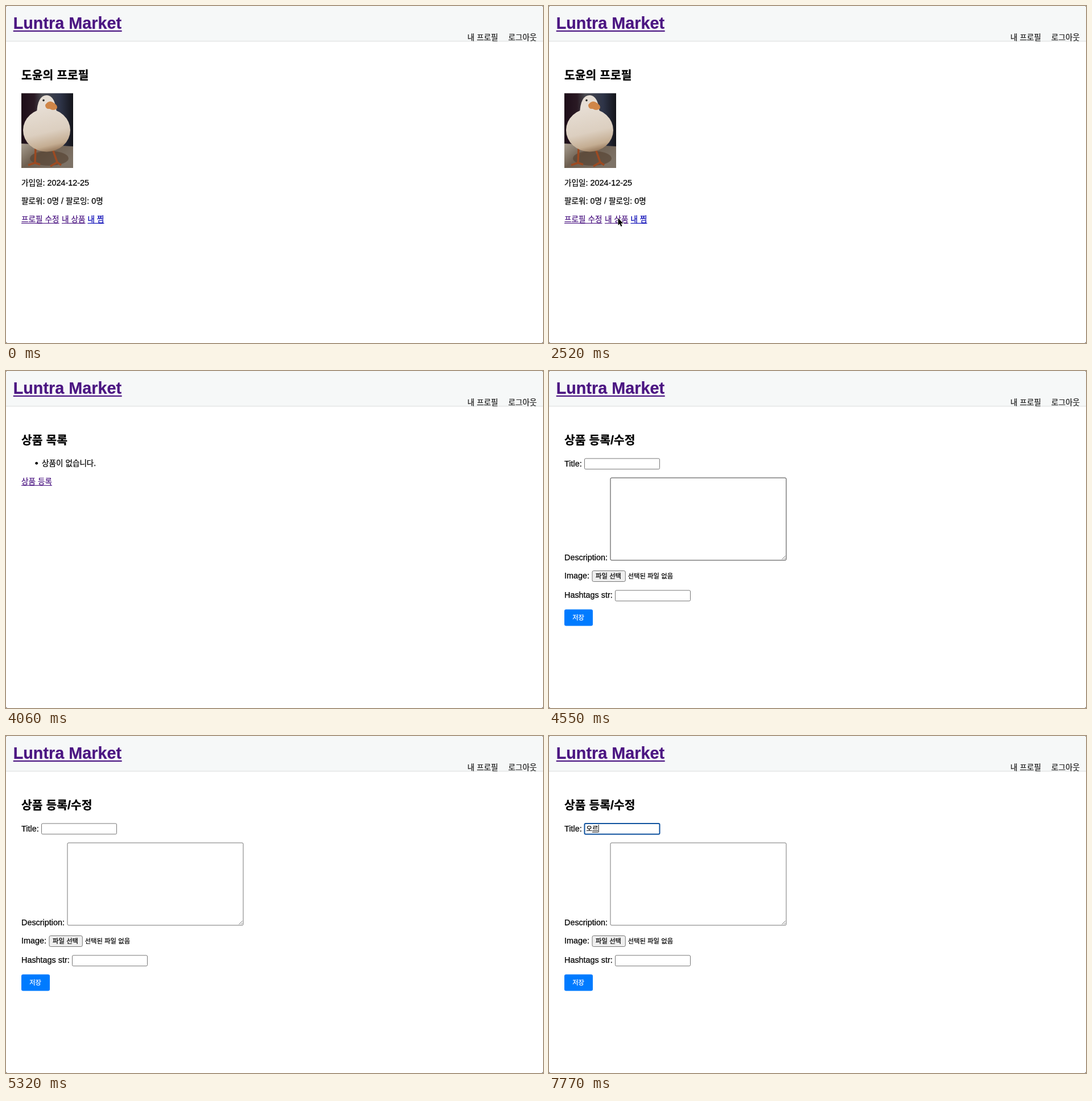
These frames come from a looping animation (944 by 593 pixels, 8000 ms). An HTML page:

```html
<!DOCTYPE html>
<html lang="ko">
<head>
<meta charset="utf-8">
<title>Luntra Market</title>
<style>
html, body { margin: 0; width: 100%; height: 100%; overflow: hidden; background: #555; }
svg { display: block; width: 944px; height: 593px; background: #fff; border-radius: 3px; color: #000; }
text { font-family: "Liberation Sans", Arial, sans-serif; white-space: pre;
  fill: currentColor; stroke: currentColor; stroke-width: .25px; }
.ko { font-family: "Noto Sans CJK KR", "Noto Sans CJK", sans-serif; font-size: .943em; }
.visited { color: #4b1582; }
.unvisited { color: #0000b4; }
.link rect { fill: currentColor; }
.field { fill: #fff; stroke: #767676; }
</style>
</head>
<body>
<svg id="stage" viewBox="0 0 944 593"></svg>
<script>
const LOOP = 8000;
const stage = document.getElementById('stage');

// Hangul runs use a slightly smaller face than the Latin text around them.
const runs = s => s.replace(/[ㄱ-ㅎ가-힣]+/g, '<tspan class="ko">$&</tspan>');
const text = (x, y, s, size = 14.4, attrs = '') =>
  `<text x="${x}" y="${y}" font-size="${size}" ${attrs}>${runs(s)}</text>`;
const heading = s => text(27, 128.5, s, 21.6, 'font-weight="bold"');
const link = (x, y, w, s, kind = 'visited', id = '') =>
  `<g class="link ${kind}" id="${id}">${text(x, y, s)}<rect x="${x}" y="${y + 1.8}" width="${w}" height="1.1"/></g>`;
const field = (id, x, y, w, h) =>
  `<rect class="field" id="${id}" x="${x}" y="${y}" width="${w}" height="${h}" rx="2"/>`;

const header = `
  <rect width="944" height="62" fill="#f6f8f8"/>
  <rect y="61.5" width="944" height="1" fill="#dcdedd"/>
  <g class="link visited">
    ${text(12.7, 40, 'Luntra Market', 28.8, 'font-weight="bold"')}
    <rect x="12.7" y="43" width="191" height="2.2"/>
  </g>
  <g color="#222">${text(811, 59.5, '내 프로필')}${text(883, 59.5, '로그아웃')}</g>`;

const photo = `
  <defs>
    <linearGradient id="wall">
      <stop offset="0" stop-color="#1d0d18"/><stop offset=".25" stop-color="#2a1a24"/>
      <stop offset=".4" stop-color="#4a4a50"/><stop offset=".75" stop-color="#2e3448"/>
      <stop offset="1" stop-color="#14141a"/>
    </linearGradient>
    <linearGradient id="floor" x2="1" y2=".6">
      <stop offset="0" stop-color="#a89e90"/><stop offset=".45" stop-color="#6e5f50"/>
      <stop offset="1" stop-color="#7d7266"/>
    </linearGradient>
    <linearGradient id="down" x1=".35" x2=".6" y2="1">
      <stop offset="0" stop-color="#e6ddd3"/><stop offset=".55" stop-color="#dccfc0"/>
      <stop offset=".85" stop-color="#c4ad92"/><stop offset="1" stop-color="#96775a"/>
    </linearGradient>
  </defs>
  <rect x="27" y="153.5" width="91" height="131.5" fill="url(#wall)"/>
  <path d="M27 242L118 247V285H27Z" fill="url(#floor)"/>
  <ellipse cx="76" cy="268" rx="34" ry="13" fill="#54402f" opacity=".6"/>
  <path d="M52 250L51 276L39 280M51 276L60 279M82 252L90 275L78 282M90 275L97 280"
    fill="none" stroke="#9c4a22" stroke-width="3.5"/>
  <path d="M54 190Q55 157 72 157Q87 158 89 190Z" fill="#e6ded5"/>
  <ellipse cx="71.5" cy="218.5" rx="41.5" ry="38" fill="url(#down)"/>
  <path d="M69 174Q76 163 86 172Q92 176 89 181Q83 185 77 181Q69 182 69 174Z" fill="#d08648"/>
  <circle cx="66" cy="166" r="1.8" fill="#222"/>`;

const profile = `<g id="profile">
  ${heading('도윤의 프로필')}${photo}
  ${text(27, 316, '가입일: 2024-12-25')}
  ${text(27, 348, '팔로워: 0명 / 팔로잉: 0명')}
  ${link(27, 380, 66.5, '프로필 수정')}
  ${link(98, 380, 41.5, '내 상품', 'visited', 'goods')}
  ${link(143.5, 380, 29, '내 찜', 'unvisited')}</g>`;

const list = `<g id="list">
  ${heading('상품 목록')}
  <circle cx="53.7" cy="162.3" r="2.4"/>
  ${text(63, 167, '상품이 없습니다.')}
  ${link(27, 199, 54, '상품 등록', 'visited', 'add')}</g>`;

const form = `<g id="form">
  ${heading('상품 등록/수정')}
  ${text(27, 167.5, 'Title:')}${field('title', 62.5, 154, 132, 18.7)}
  ${text(27, 333, 'Description:')}${field('desc', 108, 188, 309, 145)}
  <path d="M409.5 331.5L415.5 325.5M413 331.5L415.5 329" stroke="#777"/>
  ${text(27, 364.8, 'Image:')}
  <rect x="76" y="351.5" width="58.3" height="19" rx="2.5" fill="#efefef" stroke="#767676"/>
  ${text(82, 364.5, '파일 선택', 12)}${text(138.7, 364.5, '선택된 파일 없음', 12)}
  ${text(27, 399, 'Hashtags str:')}${field('tags', 116.5, 386, 132, 18.7)}
  <rect x="27" y="419.5" width="50" height="29" rx="3" fill="#007bff"/>
  ${text(41.2, 437.5, '저장', 12, 'color="#fff"')}
  ${text(65.5, 167.2, '', 12, 'id="typed"')}
  <rect id="compose" y="168.6" width="10.4" height="1"/>
  <rect id="caret" y="156" width="1" height="13.5"/></g>`;

const arrow = `<path id="arrow" d="M0 0V12.5L2.9 9.9L4.9 14.6L7 13.7L5 9.1H8.9Z"
  stroke="#fff" stroke-width="1.4" paint-order="stroke"/>`;

stage.innerHTML = header + profile + list + form + arrow;

const el = id => document.getElementById(id);
const show = (id, on) => { el(id).style.display = on ? '' : 'none'; };
const keys = [[0, ''], [6300, 'ㅇ'], [6510, '오'], [6860, '올'], [7070, '오르'], [7490, '오륵'], [7630, '오르']];

function draw(t) {
  const during = (a, b) => t >= a && t < b;
  const press = (id, on) => { el(id).style.color = on ? '#f00' : ''; };
  const hover = (id, on) => { el(id).style.stroke = on ? '#3f3f3f' : ''; };

  show('profile', t < 2660);
  show('list', during(2660, 4130));
  show('form', t >= 4130);

  press('goods', during(2310, 2520));
  press('add', during(3850, 4060));

  show('arrow', during(1680, 1960) || during(2520, 3010));
  el('arrow').setAttribute('transform', `translate(121.5 ${t < 2000 ? 372 : 373.3})`);

  hover('desc', during(4550, 4690) || during(5040, 5320));
  hover('tags', during(4760, 4970));
  hover('title', during(5460, 5670));
  const focused = t >= 5670;
  if (focused) el('title').style.stroke = '#10539f';
  el('title').style.strokeWidth = focused ? 2 : 1;

  const word = keys.findLast(k => t >= k[0])[1];
  const end = 65.5 + 10.4 * word.length;
  if (el('typed').textContent !== word) el('typed').innerHTML = runs(word);
  show('compose', word);
  el('compose').setAttribute('x', end - 10.4);
  show('caret', focused && !during(6160, 6300));
  el('caret').setAttribute('x', end + .3);
}

function tick() {
  draw(performance.now() % LOOP);
  requestAnimationFrame(tick);
}
tick();
</script>
</body>
</html>
```
